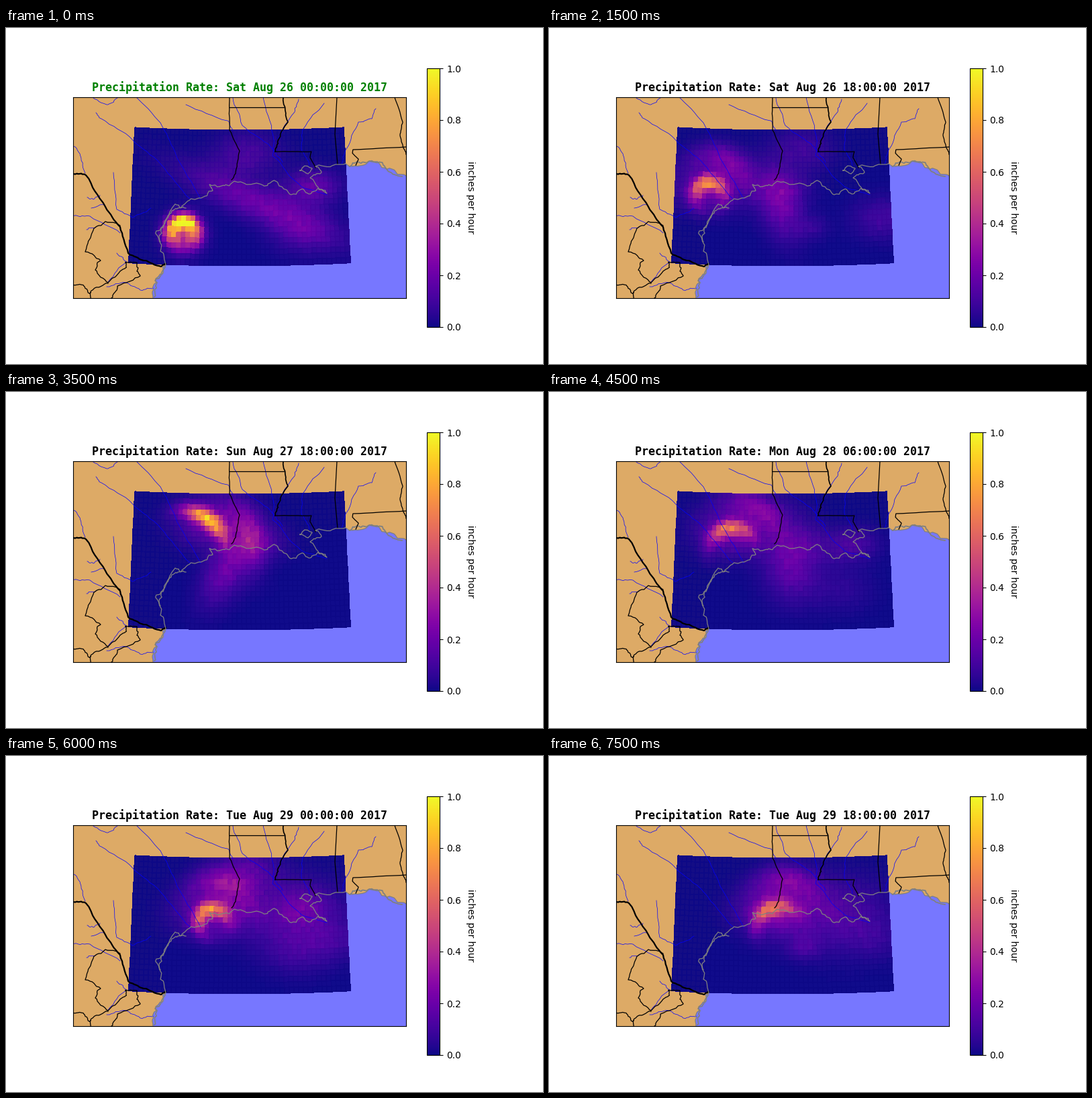
Animation, 800 px wide and 500 px high, one loop 8000 ms. Source, as a matplotlib script:

```python
import numpy as np
import matplotlib.pyplot as plt
from matplotlib.animation import FuncAnimation
from matplotlib.cm import ScalarMappable
from matplotlib.colors import Normalize

W, H, FRAMES, STEP = 800, 500, 16, 500
COLS, ROWS = 47, 25
LAND, OCEAN, RIVER = "#ddaa66", "#7777ff", "blue"
DAYS = ("Sat", "Sun", "Mon", "Tue")
norm = Normalize(0, 1)

fig = plt.figure(figsize=(W / 100, H / 100), dpi=100, facecolor="white")
ax = fig.add_axes([100 / W, 98 / H, 496 / W, 299 / H], facecolor=OCEAN)
ax.set(xlim=(100, 596), ylim=(402, 103), xticks=[], yticks=[])


def rough(points, amp, levels=3):
    """Add fractal detail to a polyline by midpoint displacement."""
    p = np.array(points, float)
    rng = np.random.default_rng(int(p.sum()))
    for _ in range(levels):
        d = np.diff(p, axis=0)
        size = np.minimum(np.hypot(*d.T) * .3, amp)
        mid = (p[:-1] + p[1:]) / 2 + rng.uniform(-1, 1, d.shape) * size[:, None]
        out = np.empty((2 * len(p) - 1, 2))
        out[::2], out[1::2] = p, mid
        p, amp = out, amp * .7
    return p


def line(*points, color="k", lw=.9, amp=.4):
    ax.plot(*rough(points, amp).T, color=color, lw=lw, zorder=4)


def river(*points):
    line(*points, color=RIVER, lw=.5, amp=2)


# Coast and land
coast = rough([
    (219, 402), (223, 373), (238, 352), (228, 312), (237, 290), (247, 272),
    (262, 265), (297, 250), (308, 242), (303, 233), (318, 236), (340, 228),
    (383, 234), (400, 227), (425, 248), (440, 240), (455, 246), (468, 240),
    (478, 246), (453, 223), (470, 215), (461, 206), (500, 203), (516, 206),
    (548, 199), (578, 211), (596, 220)], 4)
ax.fill(*np.vstack([coast, [(596, 103), (100, 103), (100, 402)]]).T,
        color=LAND, lw=0, zorder=1)
ax.plot(*coast.T, color="gray", lw=.9, zorder=5)
line((438, 212), (445, 205), (456, 209), (450, 217), (438, 212), color="gray", amp=1)
line((512, 206), (530, 200), (562, 204), (590, 221), color="gray", lw=1.3, amp=4)
line((221, 400), (222, 376), (237, 356), color="gray", lw=1.2, amp=4)
line((230, 318), (223, 306), (234, 297), (252, 262), (268, 268), color="gray", amp=3)

# Rivers
river((194, 103), (230, 141), (252, 185), (290, 255))
river((134, 126), (142, 135), (188, 166), (230, 202), (275, 255))
river((268, 114), (330, 138), (338, 152))
river((338, 104), (352, 145), (395, 178), (412, 200))
river((383, 103), (398, 160), (397, 190), (440, 236), (478, 248))
river((474, 112), (443, 150), (440, 180), (452, 205))
river((436, 106), (430, 125), (405, 165))
river((551, 120), (545, 135), (525, 140), (507, 180), (500, 202))
river((160, 215), (165, 270), (188, 282), (216, 268))
river((100, 176), (110, 187), (118, 216))
river((121, 252), (130, 255), (140, 249))
river((127, 268), (146, 262))
river((100, 279), (125, 280), (170, 305))
river((120, 300), (134, 296))
river((127, 103), (152, 114), (167, 103))
river((150, 385), (180, 379), (200, 390), (220, 387))
river((152, 378), (180, 348), (165, 335))

# Borders
line((333, 103), (333, 152), (348, 183), (342, 215), (336, 226), amp=1)
line((333, 118), (414, 118), amp=0)
line((413, 103), (420, 140), (405, 168), (401, 184), lw=1.2, amp=2.2)
line((401, 184), (455, 184), (453, 193), (461, 208))
line((493, 103), (490, 158), (494, 203), amp=0)
line((596, 177), (517, 181), (516, 186), (525, 195), (521, 205))
line((579, 103), (591, 140), (587, 160), (592, 178), (596, 188), amp=1)
line((100, 217), (119, 219), (148, 266), (170, 296), (182, 335), (205, 346),
     (231, 355), (238, 351), lw=1.6, amp=1.5)
line((170, 294), (148, 288), (131, 298), (118, 333), (141, 346), (133, 360),
     (152, 379), (177, 358), (178, 348), (195, 349), (195, 362), (200, 369),
     (166, 384), (157, 402), amp=2)
line((100, 382), (116, 384), (125, 395), (132, 387), (152, 380), amp=2)
line((125, 395), (126, 402))


# Rain grid: parallels sag toward the middle, meridians spread southward
def project(cols, rows):
    u, v = np.meshgrid(cols, rows)
    left, right = 192 - 9 * v, 503 + 10 * v
    return left + (right - left) * u, 148.3 + 201 * v + 16 * u * (1 - u)


gx, gy = project(np.linspace(0, 1, COLS + 1), np.linspace(0, 1, ROWS + 1))
cx, cy = project((np.arange(COLS) + .5) / COLS, (np.arange(ROWS) + .5) / ROWS)
mesh = ax.pcolormesh(gx, gy, np.zeros((ROWS, COLS)), cmap="plasma", norm=norm,
                     alpha=.97, edgecolors="face", linewidth=.3, zorder=2)

# Paths of the heaviest rain and of the storm centre it circles
times = (0, 3, 5, 7, 9, 12, 15)
hot_x = (264, 236, 250, 302, 268, 301, 329)
hot_y = (289, 231, 217, 190, 204, 230, 228)
heat = (.85, .55, .55, .75, .5, .55, .4)
legs = (0, 3, 9, 15)
eye_x = (265, 240, 275, 345)
eye_y = (307, 252, 240, 260)

rng = np.random.default_rng(7)
showers = rng.uniform((350, 160, 12, 0), (500, 320, 26, 6.28), (9, 4))


def bell(d, width):
    return np.exp(-.5 * (d / width) ** 2)


def blob(x, y, sx, sy):
    return bell(cx - x, sx) * bell(cy - y, sy)


def arc(ex, ey, radius, angle, width, length):
    """Rain band curved round the eye."""
    z = (cx - ex) + 1j * (cy - ey)
    turn = np.angle(z * np.exp(-1j * angle))
    return bell(np.abs(z) - radius, width) * bell(turn, length / radius)


def rain(n):
    hx, hy, power = (np.interp(n, times, k) for k in (hot_x, hot_y, heat))
    ex, ey = (np.interp(n, legs, k) for k in (eye_x, eye_y))
    radius, angle = np.hypot(hx - ex, hy - ey), np.arctan2(hy - ey, hx - ex)
    young = np.exp(-n)

    field = power * arc(ex, ey, radius, angle, 8, 26)
    field += .42 * young * blob(ex, ey, 18, 18)
    field += (1 - young) * (.2 * blob(hx + 8, hy + 4, 36, 24)
                            + .2 * arc(ex, ey, radius + 40, angle + .65, 14, 36))

    # Feeder band from the gulf swings round, then drifts east and widens
    late = np.clip((n - 8) / 4, 0, 1)
    lean = np.interp(n, (0, 5, 9), (1.7, -.8, 0))
    axis = 340 + 90 * late + lean * (cy - 240)
    spread = 20 * np.hypot(1, lean) + 30 * late
    field += (.2 - .07 * late) * bell(cx - axis, spread) * bell(cy - 262 + 25 * late, 36)

    # Light showers come and go
    for x, y, size, phase in showers:
        field += .1 * max(0, np.sin(phase + n * .6)) * blob(x - n, y - n, size * 1.4, size)

    field *= np.random.default_rng(n).uniform(.88, 1.12, field.shape)
    return np.clip(field, 0, 1)


# Colour bar and labels
cax = fig.add_axes([627 / W, .11, 19.25 / W, .77])
fig.colorbar(ScalarMappable(norm, "plasma"), cax=cax, ticks=np.linspace(0, 1, 6))
fig.text(692 / W, .495, "inches per hour", rotation=270, ha="center", va="center")
title = ax.set_title("", family="DejaVu Sans Mono", weight="bold", fontsize=12, pad=6.7)
for side in ax.spines.values():
    side.set_zorder(6)


def draw(n):
    day, hour = divmod(6 * n, 24)
    title.set_text(f"Precipitation Rate: {DAYS[day]} Aug {26 + day} {hour:02d}:00:00 2017")
    title.set_color((0, max(0, .5 - n / 4), 0))
    mesh.set_array(rain(n))
    return mesh, title


anim = FuncAnimation(fig, draw, frames=FRAMES, interval=STEP, repeat=True,
                     repeat_delay=0, blit=False)
plt.show()
```
